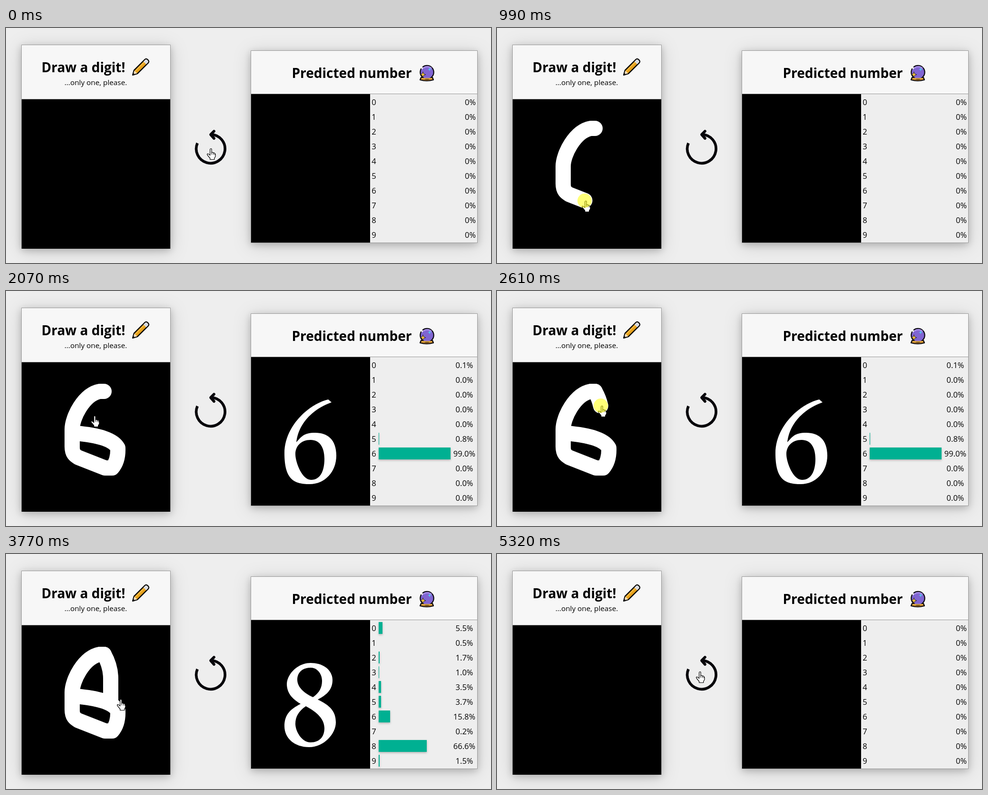
Write an HTML page that moves like this. It is 1019 px wide and 494 px high and loops after 6120 ms.

```html
<!DOCTYPE html>
<html lang="en">
<head>
<meta charset="utf-8">
<title>Draw a digit</title>
<style>
  html, body { margin: 0; width: 100%; height: 100%; overflow: hidden; background: #eee; }
  svg { display: block; width: 100%; height: 100%; font-family: "Trebuchet MS", "Open Sans", sans-serif; }
  .card { filter: drop-shadow(0 4px 8px rgba(0,0,0,.2)) drop-shadow(0 5px 18px rgba(0,0,0,.14)); }
  .edge { fill: none; stroke: #999; }
  .title { font-size: 28px; font-weight: 700; }
  .note { font-size: 15.3px; }
  .row { font-size: 16.5px; }
  .bar { fill: #00b092; filter: drop-shadow(0 2px 2px rgba(0,0,0,.25)); }
  .move { fill: none; }
  .ink { fill: none; stroke: #fff; stroke-width: 32; stroke-linecap: round; stroke-linejoin: round; }
</style>
</head>
<body>
<svg viewBox="0 0 1019 494">
  <rect class="card" x="32" y="35" width="314" height="429" fill="#f7f7f7"/>
  <rect x="33" y="150" width="312" height="314"/>
  <path class="edge" d="M32.5 464V35.5H345.5V464M32 149.5H346"/>
  <text class="title" x="74.5" y="93">Draw a digit!</text>
  <text class="note" x="188.5" y="120" text-anchor="middle">...only one, please.</text>

  <g transform="translate(265.5 99.5) rotate(-45)" stroke-linejoin="round">
    <path d="M1 0L10-5H42Q46-5 46 0T42 5H10Z" fill="#e6a11c" stroke="#050505" stroke-width="2.4"/>
    <path d="M2.5 0L10-4V4Z" fill="#f3dfbd"/>
    <path d="M1 0L5-2V2Z"/>
    <path d="M11-2H37" stroke="#f4bd48" stroke-width="2"/>
    <path d="M37-4H42Q45-4 45 0T42 4H37Z" fill="#d9dce3"/>
  </g>

  <rect class="card" x="514" y="47" width="477" height="405" fill="#eee"/>
  <rect x="515" y="48" width="475" height="90" fill="#f7f7f7"/>
  <rect x="515" y="139" width="250" height="312"/>
  <path class="edge" d="M514.5 47.5H990.5V451.5H514.5ZM514 138.5H991"/>
  <text class="title" x="600.5" y="105">Predicted number</text>

  <g stroke="#08060c" stroke-width="2.2" stroke-linejoin="round">
    <path d="M872 104H896L898 109Q884 113 870 109Z" fill="#c98a2b"/>
    <circle cx="884.5" cy="93" r="14.2" fill="#8065d2"/>
  </g>
  <path d="M873 106H895" stroke="#edb34c" stroke-width="2"/>
  <path d="M877 84Q886 78 894 85" fill="none" stroke="#a58be6" stroke-width="3"/>
  <defs><path id="star" d="M0-6L1.6-1.6L6 0L1.6 1.6L0 6L-1.6 1.6L-6 0L-1.6-1.6Z"/></defs>
  <use href="#star" x="876" y="98" fill="#fbc93d" stroke="#08060c" stroke-width=".7"/>
  <use href="#star" transform="translate(890 87) scale(.67)" fill="#55c8f2"/>
  <use href="#star" transform="translate(874 84) scale(.67)" fill="#fff"/>

  <g fill="none" stroke="#07060b" stroke-width="5.7" stroke-linejoin="round">
    <path d="M402.2 242A30.2 30.2 0 1 0 431 223.8"/>
    <path d="M437 217L430 224L437 232" stroke-linecap="round"/>
  </g>

  <g id="legs"></g>
  <path id="digit" fill="#fff" fill-rule="evenodd"/>
  <g id="rows"></g>

  <g id="cursor">
    <path d="M.7 14V2.4Q.7.5 2.4.5T4.1 2.4V9Q6.5 7.2 7.7 9.8Q10 8.5 11 11Q12 11.2 12 13V17L9.7 21V23.5H.8V21L-4.5 14.5Q-6.5 11.6-4 11.4Q-2.2 11.6.7 14.5Z" fill="#fff" stroke="#000" stroke-width="1.2" stroke-linejoin="round"/>
    <path d="M4.1 9V13M7.7 10V13.5M10.8 11V14" stroke="#000"/>
    <circle id="glow" r="15" fill="#ff0" fill-opacity=".53"/>
  </g>
</svg>
<script>
const LOOP = 6120, FRAME = 76.8, RESET = 5320;

const SIX = "M677 228C635 238 585 285 585 341S606 406 638 406 694 380 694 346 675 298 650 298 621 306 610 318" +
  "C614 282 640 250 684 234ZM640 313C620 313 608 326 608 343S622 397 641 397 669 379 669 353 658 313 640 313Z";
const EIGHT = "M640 229C668 229 686 245 686 265S674 296 655 306C680 318 693 330 693 354S668 406 637 406 585 387 585 362 598 326 619 315" +
  "C600 304 590 291 590 273S611 229 640 229ZM640 239C623 239 612 249 612 264S625 292 645 301C658 292 664 281 664 267S655 239 640 239Z" +
  "M630 320C615 330 608 342 608 357S621 396 640 396 669 384 669 366 655 333 630 320Z";

const EMPTY = { shape: "" };
const SIX_RESULT = { shape: SIX, odds: [.1, 0, 0, 0, 0, .8, 99, 0, 0, 0] };
const EIGHT_RESULT = { shape: EIGHT, odds: [5.5, .5, 1.7, 1, 3.5, 3.7, 15.8, .2, 66.6, 1.5] };

// The pointer follows each leg at constant speed and rests in between.
const legs = [
  { start: 0, end: 540, d: "M428 253Q310 240 206 211" },
  { start: 530, end: 1400, up: 1460, result: SIX_RESULT,
    d: "M206 211H197C164 217 139 265 139 291V327C139 342 145 346 152 350L208 372H223Q236 357 235 330Q222 305 146 299" },
  { start: 1770, end: 2450, d: "M146 299Q208 255 200 200" },
  { start: 2530, end: 2740, up: 2840, result: EIGHT_RESULT, d: "M198 211H206Q220 236 220 262V306" },
  { start: 3700, end: 4340, d: "M218 306Q300 305 424 247" },
  { start: 5150, end: 5160, up: RESET, result: EMPTY, d: "M424 247h.1" }
];

const byId = id => document.getElementById(id);

function add(parent, tag, attrs) {
  const node = document.createElementNS("http://www.w3.org/2000/svg", tag);
  for (const name in attrs) node.setAttribute(name, attrs[name]);
  return byId(parent).appendChild(node);
}

for (const leg of legs) {
  const inked = leg.result && leg.result !== EMPTY;
  leg.path = add("legs", "path", { d: leg.d, class: inked ? "ink" : "move" });
  leg.length = leg.path.getTotalLength();
}

const rows = Array.from({ length: 10 }, (_, i) => {
  const y = 162 + 31 * i;
  add("rows", "text", { class: "row", x: 768.3, y }).textContent = i;
  return {
    bar: add("rows", "rect", { class: "bar", x: 783, y: y - 19, height: 25 }),
    label: add("rows", "text", { class: "row", y, "text-anchor": "middle" })
  };
});

let shown;
function showResult({ shape, odds }) {
  if (shape === shown) return;
  shown = shape;
  byId("digit").setAttribute("d", shape);
  rows.forEach(({ bar, label }, i) => {
    bar.setAttribute("width", odds ? Math.floor(odds[i] * 1.53) : 0);
    label.setAttribute("x", odds ? 963 : 975.5);
    label.textContent = odds ? odds[i].toFixed(1) + "%" : "0%";
  });
}

function draw(t) {
  const held = Math.floor((t + 10) / FRAME) * FRAME;
  let point, result = EMPTY, pressed = false;
  for (const { start, end, up, path, length, result: outcome } of legs) {
    const done = Math.min(1, (held - start) / (end - start)) * length;
    path.setAttribute("visibility", done >= 0 && t < RESET ? "visible" : "hidden");
    if (done < 0) continue;
    path.setAttribute("stroke-dasharray", `${done} 999`);
    point = path.getPointAtLength(done);
    if (t >= up) result = outcome;
    pressed = t < up;
  }
  byId("cursor").setAttribute("transform", `translate(${Math.round(point.x)} ${Math.round(point.y)})`);
  byId("glow").setAttribute("visibility", pressed ? "visible" : "hidden");
  showResult(result);
}

const begin = performance.now();
function tick() {
  draw((performance.now() - begin) % LOOP);
  requestAnimationFrame(tick);
}
tick();
</script>
</body>
</html>
```
